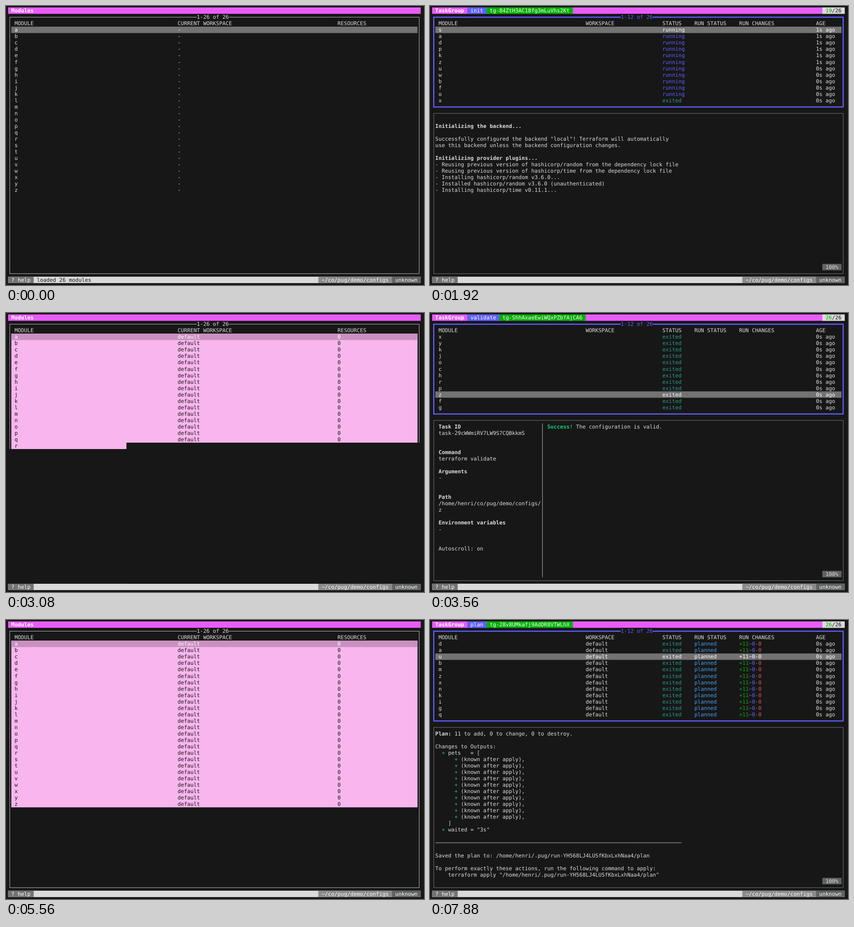
Recreate the animation shown at these times as an HTML page with a canvas. Size 917 px wide and 611 px high, loop 8000 ms.

```html
<!DOCTYPE html>
<html lang="en">
<head>
<meta charset="utf-8">
<title>Terminal module runner</title>
<style>
html, body { margin: 0; height: 100%; overflow: hidden; background: #171717; }
canvas { display: block; }
</style>
</head>
<body>
<canvas id="screen" width="917" height="611"></canvas>
<script>
const ctx = document.getElementById('screen').getContext('2d');
ctx.textRendering = 'geometricPrecision';
const LOOP = 8000, TICK = 40, COLS = 129;
const CELL_W = 7.017, CELL_H = 14.04, LEFT = 4.6, TOP = 3.1, THIN = 0.85;
const BG = '#171717', FG = '#dddddd', WHITE = '#ffffff', BLACK = '#171717';
const PINK = '#e85cfc', BLUE = '#5f5fff', GREEN = '#00af00', TEAL = '#259a8c', SKY = '#439fee';
const GREY = '#737373', DIM = '#8a8a8a', DARK = '#606362', PALE = '#dadada', RED = '#e05252';
const ADD = '#31bb71', OK = '#14cd7e';
const HOME = '/home/henri';

const x = c => LEFT + c * CELL_W;
const y = r => TOP + r * CELL_H;
// Box-drawing strokes run through the middle of a cell.
const midX = c => x(c) + 3.6;
const midY = r => y(r) + 7.4;

function fill(r, c, rows, cols, color) {
  ctx.fillStyle = color;
  ctx.fillRect(x(c), y(r), cols * CELL_W, rows * CELL_H);
}

// Writes text on the cell grid and returns the next free column.
function put(r, c, text, fg = FG, bg, bold) {
  if (bg) fill(r, c, 1, text.length, bg);
  ctx.font = (bold ? 'bold ' : '') + '11.65px "DejaVu Sans Mono", monospace';
  ctx.fillStyle = fg;
  for (const ch of text) {
    if (ch !== ' ') ctx.fillText(ch, x(c), y(r) + 11.1);
    c++;
  }
  return c;
}

function line(x0, y0, x1, y1) {
  ctx.strokeStyle = FG;
  ctx.lineWidth = THIN;
  ctx.beginPath();
  ctx.moveTo(x0, y0);
  ctx.lineTo(x1, y1);
  ctx.stroke();
}

function box(top, bottom, color, weight = THIN, title) {
  ctx.strokeStyle = color;
  ctx.lineWidth = weight;
  ctx.strokeRect(midX(0), midY(top), (COLS - 1) * CELL_W, (bottom - top) * CELL_H);
  if (title) put(top, 59, title, color, BG);
}

function footer(message = '') {
  fill(42, 0, 1, COLS, PALE);
  put(42, 0, ' ? help ', WHITE, GREY);
  put(42, 9, message, BLACK);
  put(42, 97, ' ~/co/pug/demo/configs ', WHITE, DIM);
  put(42, 120, ' unknown ', WHITE, DARK);
}

const HELP = [
  [1, 9, 'm:modules|w:workspaces|t:tasks|T:taskgroups|l:logs|esc:back|enter:view|<space>:select|ctrl+a:select all|ctrl+\\:clear selection'],
  [27, 40, 'ctrl+<space>:select range|/:filter|ctrl+s:toggle autoscroll|ctrl+c:exit|?:help|↑/k:up|↓/j:down|b/pgup:page up|f/pgdn:page down|u:½ page up'],
  [60, 67, 'd:½ page down|g/home:go to start|G/end:go to end|tab:switch pane']
];

function help() {
  box(30, 41, FG);
  for (const [keyCol, textCol, items] of HELP)
    items.split('|').forEach((item, i) => {
      const [key, text] = item.split(':');
      put(31 + i, keyCol, key, FG, null, true);
      put(31 + i, textCol, text, '#9a9a9a');
    });
}

function modules({ selected, workspace = '-', resources = '', message, showHelp }) {
  fill(0, 0, 1, COLS, PINK);
  put(0, 1, 'Modules', WHITE, null, true);
  box(1, showHelp ? 29 : 41, FG, THIN, '1-26 of 26');
  put(2, 2, 'MODULE');
  put(2, 53, 'CURRENT WORKSPACE');
  put(2, 103, 'RESOURCES');
  if (selected) fill(3, 1, 26, 127, '#f9b6ee');
  fill(3, 1, 1, 127, selected ? '#c990c0' : GREY);
  [...'abcdefghijklmnopqrstuvwxyz'].forEach((name, i) => {
    const r = 3 + i, fg = i === 0 ? WHITE : selected ? BLACK : FG;
    put(r, 2, name, fg);
    put(r, 53, workspace, fg);
    put(r, 103, resources, fg);
  });
  if (showHelp) help();
  footer(message);
}

// order: module names shown; exited(i): whether row i has finished.
function taskGroup({ name, id, done, order, cursor, exited, age, plan }) {
  fill(0, 0, 1, COLS, PINK);
  put(0, 0, ' TaskGroup ', WHITE, null, true);
  const c = put(0, 11, ` ${name} `, WHITE, BLUE);
  put(0, c, ` ${id} `, WHITE, GREEN);
  const count = ` ${done}/26 `, start = COLS - count.length;
  fill(0, start, 1, count.length, PALE);
  put(0, put(0, start + 1, String(done), GREEN), '/26', BLACK);

  box(1, 15, BLUE, 2.5, '1-12 of 26');
  [[2, 'MODULE'], [48, 'WORKSPACE'], [72, 'STATUS'], [82, 'RUN STATUS'], [96, 'RUN CHANGES'], [120, 'AGE']]
    .forEach(([col, text]) => put(2, col, text));
  [...order].forEach((module, i) => {
    const r = 3 + i, current = i === cursor, over = exited(i);
    const tint = color => current ? WHITE : color;
    if (current) fill(r, 1, 1, 127, GREY);
    put(r, 2, module, tint(FG));
    put(r, 72, over ? 'exited' : 'running', tint(over ? TEAL : BLUE));
    put(r, 120, age(i) + 's ago', tint(FG));
    if (!plan) return;
    put(r, 48, 'default', tint(FG));
    put(r, 82, over ? 'planned' : 'planning', tint(over ? SKY : BLUE));
    if (over) put(r, put(r, put(r, 96, '+11', tint(GREEN)), '~0', tint(BLUE)), '-0', tint(RED));
  });
  footer();
}

// Each line is a string or a list of [text, colour, bold] spans.
function pane(lines, { bottom = 41, col = 1 } = {}) {
  box(16, bottom, DIM);
  lines.slice(17 - bottom).forEach((spans, i) => {
    let c = col;
    if (typeof spans === 'string') spans = [[spans]];
    for (const [text, color, bold] of spans) c = put(17 + i, c, text, color, null, bold);
  });
  put(bottom - 1, 122, ' 100% ', FG, DARK);
}

const bold = text => [[text, FG, true]];
const added = (indent, text) => [[' '.repeat(indent) + '+ ', ADD], [text]];
const awaiting = t => ['Awaiting output ' + '-\\|/'[t / TICK % 4]];
const clamp = (v, max) => Math.max(0, Math.min(max, Math.floor(v)));

const INIT_OUTPUT = [
  '', bold('Initializing the backend...'), '',
  'Successfully configured the backend "local"! Terraform will automatically',
  'use this backend unless the backend configuration changes.', '',
  bold('Initializing provider plugins...'),
  '- Reusing previous version of hashicorp/random from the dependency lock file',
  '- Reusing previous version of hashicorp/time from the dependency lock file',
  '- Installing hashicorp/random v3.6.0...',
  '- Installed hashicorp/random v3.6.0 (unauthenticated)',
  '- Installing hashicorp/time v0.11.1...',
  '- Installed hashicorp/time v0.11.1 (unauthenticated)', '',
  [['Terraform has been successfully initialized!', OK, true]], '',
  'You may now begin working with Terraform. Try running "terraform plan" to see',
  'any changes that are required for your infrastructure. All Terraform commands',
  'should now work.', '',
  'If you ever set or change modules or backend configuration for Terraform,',
  'rerun this command to reinitialize your working directory. If you forget, other',
  'commands will detect it and remind you to do so if necessary.'
];
const VALID = [[['Success!', OK, true], [' The configuration is valid.']]];

function planOutput(run) {
  const path = `${HOME}/.pug/run-${run}/plan`;
  return [
    [['Plan:', FG, true], [' 11 to add, 0 to change, 0 to destroy.']], '',
    'Changes to Outputs:', added(2, 'pets   = ['),
    ...Array(10).fill(added(6, '(known after apply),')),
    '    ]', added(2, 'waited = "3s"'), '', '', '',
    'Saved the plan to: ' + path, '',
    'To perform exactly these actions, run the following command to apply:',
    `    terraform apply "${path}"`, ''
  ];
}

function taskInfo(module, id) {
  line(midX(34), y(17), midX(34), y(41));
  const items = [
    [17, 'Task ID', 'task-' + id], [21, 'Command', 'terraform validate'], [24, 'Arguments', '-'],
    [28, 'Path', HOME + '/co/pug/demo/configs/'], [32, 'Environment variables', '-']
  ];
  for (const [r, label, value] of items) {
    put(r, 2, label, FG, null, true);
    put(r + 1, 2, value);
  }
  put(30, 2, module);
  put(36, 2, 'Autoscroll: on');
}

function initScene(t) {
  const finished = t >= 2000;
  taskGroup({
    name: 'init', id: 'tg-84ZtH3AC18fg3mLuVhs2Kt',
    done: finished ? 26 : clamp((t - 1680) / 240 * 19, 26),
    order: finished ? 'yrmjqcvgsetl' : 'sadpkzuwbfox',
    cursor: finished ? (t < 2520 ? 8 : 9) : 0,
    exited: i => finished || (t >= 1840 && i === 11),
    age: i => finished || (t >= 1840 && i < 6) ? 1 : 0
  });
  const shown = finished ? INIT_OUTPUT.length : clamp((t - 1680) / 20, 14);
  pane(shown ? INIT_OUTPUT.slice(0, shown) : awaiting(t));
}

function validateScene(t) {
  const done = clamp((t - 3160) / 200 * 26, 26), settled = t >= 3560;
  taskGroup({
    name: 'validate', id: 'tg-ShhAxaeEwiWQxPZbfAjCA6', done,
    order: settled ? 'xykjochrpzfg' : 'ozykjchxrpfg',
    cursor: t < 3560 ? 1 : t < 3920 ? 9 : t < 4480 ? 10 : 11,
    exited: i => done === 26 || i >= 12 - done / 2.2,
    age: () => t < 4480 ? 0 : 1
  });
  const info = t >= 3400 && t < 5080;
  pane(t < 3280 ? awaiting(t) : VALID, { col: info ? 36 : 1 });
  if (!info) return;
  if (t < 3960) taskInfo('z', '29cWWmiRV7LW9S7CQBkkmS');
  else if (t < 4480) taskInfo('f', 'Lq4TnVb8XsKe2RwYd6HcJp');
  else taskInfo('g', '7mBxDfQ5uNzGk9AtWv3ErS');
}

function planScene(t) {
  const finished = t >= 7240, showHelp = !finished;
  const done = clamp((t - 6840) / 400 * 26, 26);
  taskGroup({
    name: 'plan', id: 'tg-28v8UMkafj9AdDR8VTWLhX', done, plan: true,
    order: finished ? 'daubmzxnkigq' : 'ivosltfnewhp',
    cursor: finished ? (t < 7840 ? 1 : 2) : 0,
    exited: i => finished || i >= 12 - done / 2.2,
    age: () => 0
  });
  if (t < 7080) pane(awaiting(t), { bottom: 29 });
  else {
    pane(planOutput(t < 7880 ? 'Tc93WQmR7bPzVeKdLs5Gy2' : 'YH568LJ4LUSfKbxLxhNaa4'), { bottom: showHelp ? 29 : 41 });
    const rule = showHelp ? 22 : 34;
    line(x(1), midY(rule), x(78), midY(rule));
  }
  if (showHelp) help();
}

function draw(t) {
  ctx.fillStyle = BG;
  ctx.fillRect(0, 0, 917, 611);
  const ready = { selected: true, workspace: 'default', resources: '0' };
  if (t < 960) modules({ message: 'loaded 26 modules' });
  else if (t < 1480) modules({ selected: true });
  else if (t < 3080) initScene(t);
  else if (t < 3160) {
    modules(ready);
    if (t < 3120) { // screen repaint caught halfway
      fill(20, 37, 22, 93, BG);
      fill(21, 0, 21, 130, BG);
    }
  }
  else if (t < 5560) validateScene(t);
  else if (t < 6680) modules({ ...ready, showHelp: t >= 6160 });
  else planScene(t);
}

let last = -1;
const begin = performance.now();
function frame() {
  const t = Math.floor((performance.now() - begin) % LOOP / TICK) * TICK;
  if (t !== last) draw(last = t);
  requestAnimationFrame(frame);
}
frame();
</script>
</body>
</html>
```
